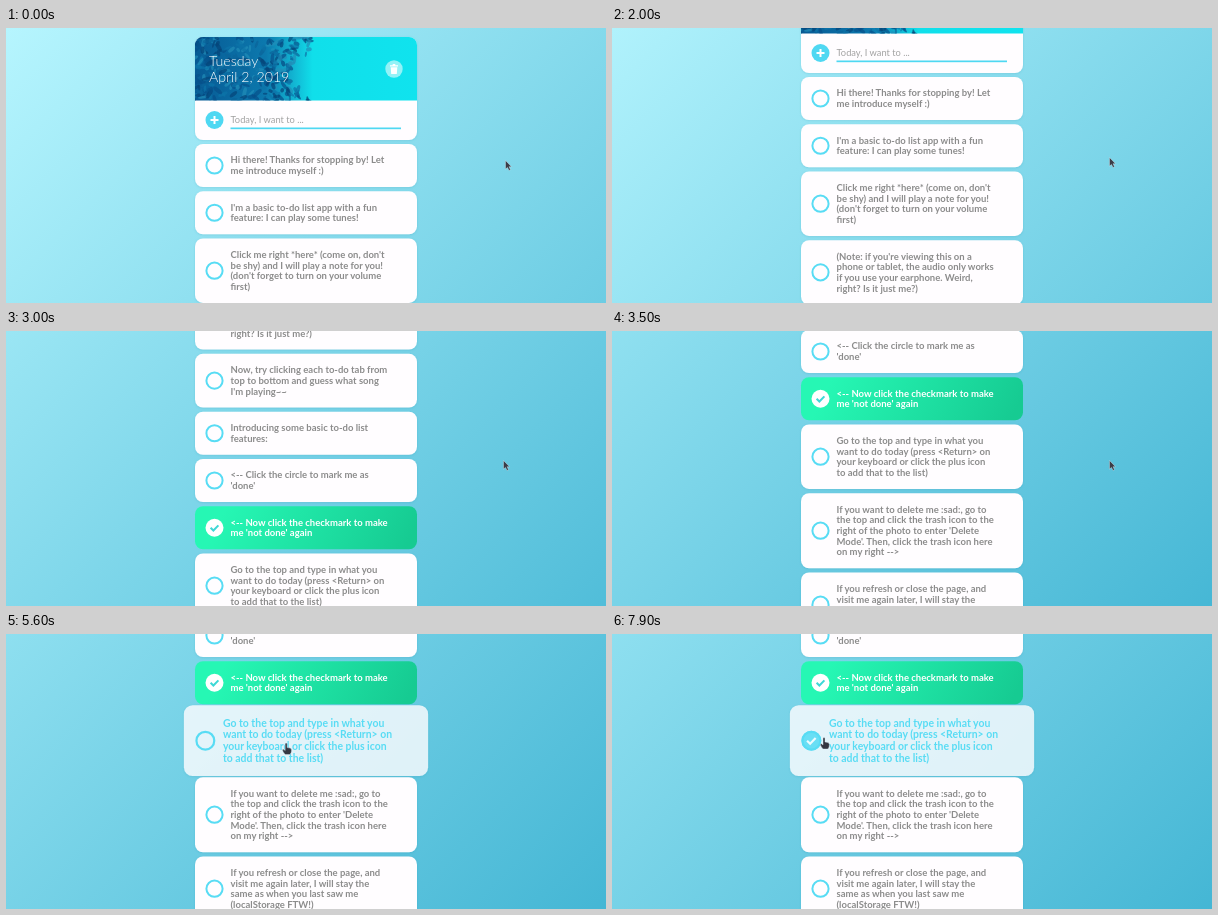
Animation of 600x275 px, one loop 8000 ms. Source, as an HTML page:

```html
<!DOCTYPE html>
<html lang="en">
<head>
<meta charset="utf-8">
<title>To-do list</title>
<style>
  html, body { margin: 0; width: 100%; height: 100%; overflow: hidden; }
  svg { display: block; width: 600px; height: 275px; }
  text { font: 700 9.5px Lato, "Open Sans", sans-serif; fill: #8c8c8c; white-space: pre; }
  text.date { font-weight: 300; font-size: 14.2px; fill: #fff; }
  text.hint { font-weight: 400; font-size: 9.3px; fill: #a2a2a2; }
</style>
</head>
<body>
<svg viewBox="0 0 600 275">
  <defs>
    <linearGradient id="sky" gradientUnits="userSpaceOnUse" x2="700" y2="700">
      <stop stop-color="#b6f5fe"/><stop offset="1" stop-color="#40b4d3"/>
    </linearGradient>
    <linearGradient id="green" gradientUnits="userSpaceOnUse" x1="220" x2="380" y2="80">
      <stop stop-color="#26f7b4"/><stop offset="1" stop-color="#16cb92"/>
    </linearGradient>
    <linearGradient id="photo">
      <stop stop-color="#075a94"/><stop offset=".32" stop-color="#0c79ae"/>
      <stop offset=".45" stop-color="#12b8d4"/><stop offset=".53" stop-color="#10dfea"/>
      <stop offset="1" stop-color="#10e3ee"/>
    </linearGradient>
    <clipPath id="photoClip"><path d="M189 72.5V17a8 8 0 0 1 8-8H403a8 8 0 0 1 8 8V72.5z"/></clipPath>
    <filter id="shade" x="-5%" y="-10%" width="110%" height="125%">
      <feDropShadow dx="0" dy=".6" stdDeviation=".8" flood-color="#1c7f9c" flood-opacity=".2"/>
    </filter>
  </defs>
  <g id="page">
    <rect width="600" height="800" fill="url(#sky)"/>
    <rect x="189" y="9" width="222" height="103" rx="8" fill="#fffdff" filter="url(#shade)"/>
    <g clip-path="url(#photoClip)">
      <rect x="189" y="9" width="222" height="64" fill="url(#photo)"/>
      <g id="leaves"></g>
    </g>
    <text class="date" x="203" y="38.3">Tuesday</text>
    <text class="date" x="203" y="54.3">April 2, 2019</text>
    <circle cx="388" cy="41" r="8.7" fill="#fff" opacity=".55"/>
    <path d="M384 37.2h8v1.3h-8zM386.7 36h2.6v1.2h-2.6zM384.7 39.2h6.6l-.5 6.8h-5.6z" fill="#fff"/>
    <circle cx="208.5" cy="92" r="9" fill="#4fd8f2"/>
    <path d="M204.5 92h8M208.5 88v8" stroke="#fff" stroke-width="2"/>
    <text class="hint" x="224.5" y="95">Today, I want to ...</text>
    <rect x="224.5" y="99.5" width="170.5" height="1.7" fill="#4fd8f2"/>
    <g id="cards"></g>
  </g>
  <g id="pointer">
    <path id="arrow" d="M0 0V8.6L2 6.9 3.5 10 5 9.3 3.6 6.2H6z" fill="#3b3c46" stroke="#d8eef4" stroke-width=".4"/>
    <path id="hand" d="M-1 0Q0-1 1 0V4Q5 4 5.4 6.4Q5.6 9 4 11H-1Q-4 7.5-3.6 6Q-2.6 5-1 7z" fill="#353640" stroke="#d8eef4" stroke-width=".4"/>
  </g>
</svg>
<script>
const $ = id => document.getElementById(id);
const LOOP = 8000, LINE = 10.7, GAP = 4.25;
const SCROLL = [[1740, 0], [3573, 473]];
const MOUSE_X = [[1100, 499.5], [2000, 497.5], [3700, 497.5], [4500, 382], [4800, 382], [6200, 204], [7200, 204], [7600, 212]];
const MOUSE_Y = [[1100, 132.5], [2000, 129.5], [3700, 129.5], [4500, 117], [4800, 117], [6200, 104]];
const HOVER = [[4650, 0], [4900, 1]];
const NEAR = [[6050, 0], [6250, 1]];
const DONE = [[6450, 0], [6650, 1], [7600, 1], [7800, 0]];
const GREY = [140, 140, 140], CYAN = [88, 220, 244], WHITE = [255, 255, 255];

const items = [
  "Hi there! Thanks for stopping by! Let|me introduce myself :)",
  "I'm a basic to-do list app with a fun|feature: I can play some tunes!",
  "Click me right *here* (come on, don't|be shy) and I will play a note for you!|(don't forget to turn on your volume|first)",
  "(Note: if you're viewing this on a|phone or tablet, the audio only works|if you use your earphone. Weird,|right? Is it just me?)",
  "Now, try clicking each to-do tab from|top to bottom and guess what song|I'm playing~~",
  "Introducing some basic to-do list|features:",
  "<-- Click the circle to mark me as|'done'",
  "<-- Now click the checkmark to make|me 'not done' again",
  "Go to the top and type in what you|want to do today (press <Return> on|your keyboard or click the plus icon|to add that to the list)",
  "If you want to delete me :sad:, go to|the top and click the trash icon to the|right of the photo to enter 'Delete|Mode'. Then, click the trash icon here|on my right -->",
  "If you refresh or close the page, and|visit me again later, I will stay the|same as when you last saw me|(localStorage FTW!)"
];

function add(parent, tag, attrs, content) {
  const el = document.createElementNS("http://www.w3.org/2000/svg", tag);
  set(el, attrs);
  if (content) el.textContent = content;
  return parent.appendChild(el);
}

function set(el, attrs) {
  for (const key in attrs) el.setAttribute(key, attrs[key]);
}

// Linear interpolation through [time, value] pairs, held at both ends.
function track(keys, t) {
  const i = keys.findIndex(key => key[0] > t);
  if (i === 0) return keys[0][1];
  if (i < 0) return keys[keys.length - 1][1];
  const [t0, a] = keys[i - 1], [t1, b] = keys[i];
  return a + (b - a) * (t - t0) / (t1 - t0);
}

const mix = (a, b, k) => a.map((v, i) => v + (b[i] - v) * k);
const rgb = c => `rgb(${c.map(Math.round)})`;

function makeCard(text, top) {
  const lines = text.split("|"), height = 21.6 + lines.length * LINE, mid = height / 2;
  const g = add($("cards"), "g", {});
  const box = { x: 189, width: 222, height, rx: 8 };
  const card = { g, top, height, mid };
  card.base = add(g, "rect", { ...box, fill: "#fffdff", filter: "url(#shade)" });
  card.green = add(g, "rect", { ...box, fill: "url(#green)" });
  card.ring = add(g, "circle", { cx: 208.5, cy: mid, r: 8.1, fill: "none", stroke: "#58dcf4", "stroke-width": 2 });
  card.disc = add(g, "circle", { cx: 208.5, cy: mid, r: 9 });
  card.check = add(g, "path", { d: `M204.6 ${mid}l2.8 2.8 5-5.2`, fill: "none", "stroke-width": 2 });
  card.lines = lines.map((line, i) => add(g, "text", { x: 224.5, y: 19.4 + i * LINE }, line));
  pose(card, 0, 0, 0);
  return card;
}

function pose(card, hover, near, done) {
  const { g, top, mid } = card, scale = 1 + hover * .1;
  set(g, { transform: `translate(300 ${top + mid}) scale(${scale}) translate(-300 ${-mid})` });
  set(card.base, { opacity: (1 - hover * .2) * (1 - done) });
  set(card.green, { opacity: done });
  set(card.ring, { opacity: 1 - done });
  const shown = Math.max(near * .88, done);
  set(card.disc, { opacity: shown, fill: rgb(mix(CYAN, WHITE, done)) });
  set(card.check, { opacity: shown, stroke: rgb(mix(WHITE, [62, 216, 214], done)) });
  const ink = rgb(mix(mix(GREY, CYAN, hover), WHITE, done));
  card.lines.forEach(line => line.style.fill = ink);
}

function growLeaves() {
  let seed = 7;
  const rand = () => (seed = seed * 16807 % 2147483647) / 2147483647;
  const shades = ["#06508a", "#0a649b", "#0c74a9", "#218db8", "#054579"];
  for (let i = 0; i < 320; i++) {
    const x = 187 + 118 * rand(), y = 8 + 66 * rand();
    if (x > 294 + 12 * Math.sin(y / 10)) continue;
    add($("leaves"), "ellipse", {
      rx: 2 + 3.5 * rand(), ry: 1 + 1.2 * rand(), fill: shades[Math.floor(rand() * 5)], opacity: .7,
      transform: `translate(${x} ${y}) rotate(${rand() * 180})`
    });
  }
}

growLeaves();
let nextTop = 116;
const cards = items.map(text => {
  const card = makeCard(text, nextTop);
  nextTop += card.height + GAP;
  return card;
});
pose(cards[7], 0, 0, 1);

function draw(now) {
  const t = now % LOOP, hover = track(HOVER, t);
  set($("page"), { transform: `translate(0 ${-Math.round(track(SCROLL, t))})` });
  pose(cards[8], hover * (2 - hover), track(NEAR, t), track(DONE, t));
  set($("pointer"), { transform: `translate(${track(MOUSE_X, t)} ${track(MOUSE_Y, t)})` });
  set($("arrow"), { opacity: hover ? 0 : 1 });
  set($("hand"), { opacity: hover ? 1 : 0 });
  requestAnimationFrame(() => draw(performance.now() - start));
}

const start = performance.now();
draw(0);
</script>
</body>
</html>
```
